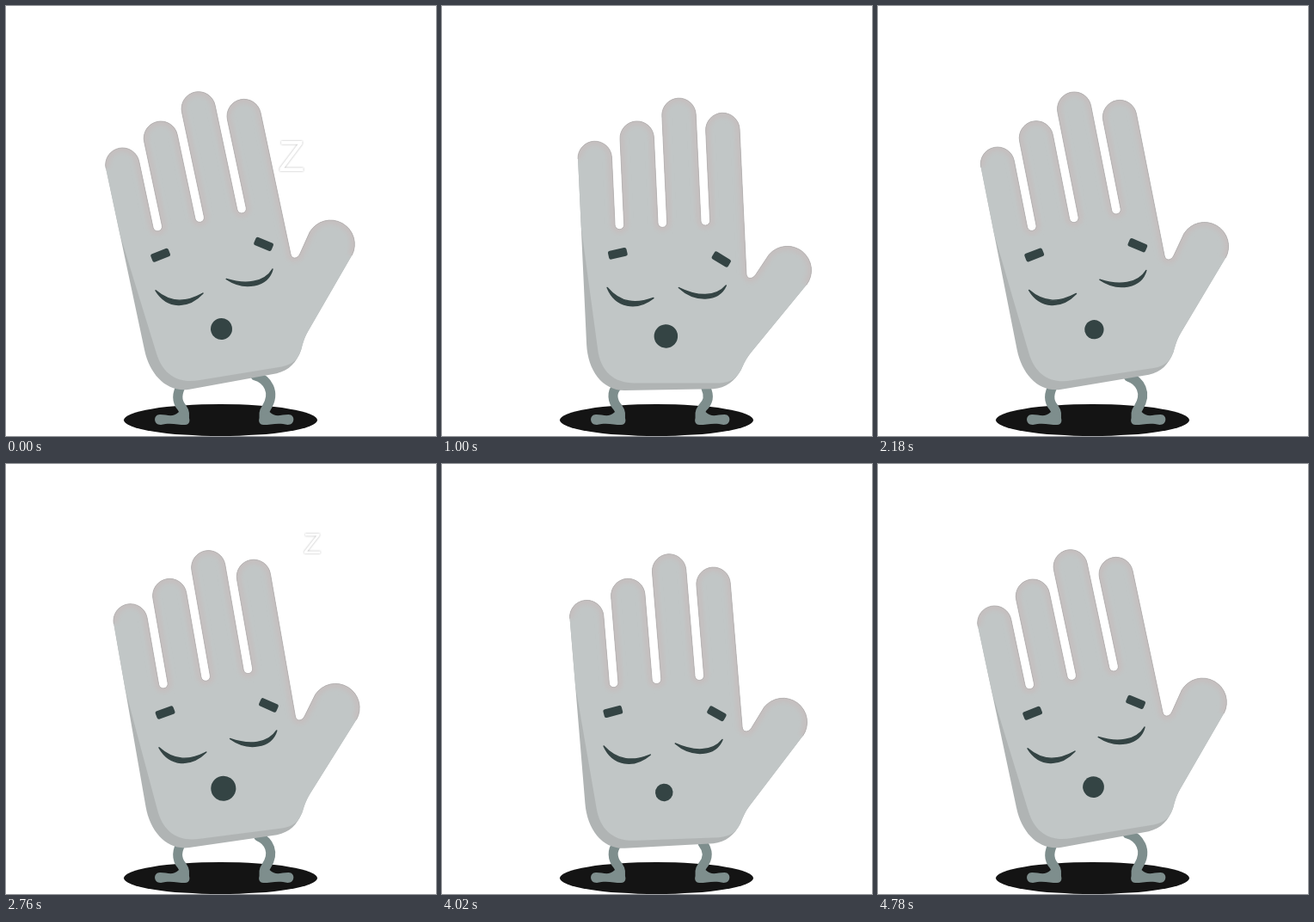
Write an HTML page that moves like this. It is 500x500 px and loops after 4800 ms.

```html
<!DOCTYPE html>
<html lang="en">
<head>
<meta charset="utf-8">
<title>Sleepy hand</title>
<style>
  html, body { margin: 0; width: 100%; height: 100%; overflow: hidden; background: #fff; }
  svg { display: block; width: 100vw; height: 100vh; }
  .leg { fill: none; stroke: #7e8e8d; stroke-width: 11; stroke-linecap: round; }
  .foot { fill: #7e8e8d; }
  .face { fill: #344444; }
  .lid { stroke: #344444; stroke-width: 1.5; stroke-linejoin: round; }
  .z {
    font-family: "Liberation Sans", Arial, sans-serif;
    text-anchor: middle;
    fill: #fff;
    filter: drop-shadow(0 0 1.2px #b4b4b4);
  }
</style>
</head>
<body>
<svg viewBox="0 0 500 500">
  <defs>
    <clipPath id="inside"><path id="clip"/></clipPath>
    <filter id="soft"><feGaussianBlur stdDeviation="2.5"/></filter>
  </defs>

  <ellipse cx="249.5" cy="481.5" rx="112.5" ry="18.5" fill="#141414"/>

  <path id="legL" class="leg"/>
  <path id="legR" class="leg"/>
  <path id="foot" class="foot" d="M179 475 C188 475 194 479 201 472 L211 475 C215 481 214 487 208 487 C200 487 191 484 180 487 C171 487 171 475 179 475Z"/>
  <use href="#foot" transform="translate(507.5) scale(-1 1)"/>

  <g id="hand">
    <path id="shade" fill="#b0b4b4"/>
    <path id="palm" fill="#c1c6c6"/>
    <g clip-path="url(#inside)">
      <path id="glow" fill="none" stroke="#c5bfbf" stroke-width="10" filter="url(#soft)"/>
    </g>
    <path id="edge" fill="none" stroke="#b3b0b0" stroke-width=".8"/>

    <g class="face">
      <rect x="-11" y="-5" width="22" height="10" rx="2.5" transform="translate(7.4 -152) rotate(-10)"/>
      <rect x="-11" y="-5" width="22" height="10" rx="2.5" transform="translate(127.4 -139.7) rotate(34)"/>
      <path class="lid" d="M-6.6 -113 C2 -89 26 -84 46.5 -98.4 C26 -92 8 -94 -6.6 -113Z"/>
      <path class="lid" d="M76.5 -109 C94 -91 122 -90 131.5 -109 C119 -95.5 97 -97.5 76.5 -109Z"/>
      <circle id="mouth" cx="58.9" cy="-53.4"/>
    </g>
  </g>

  <text id="z" class="z">Z</text>
</svg>

<script>
const $ = id => document.getElementById(id);
const set = (id, attrs) => {
  for (const name in attrs) $(id).setAttribute(name, attrs[name]);
};
const mix = (a, b, k) => a + (b - a) * k;

const PERIOD = 2400;
const Z_TIME = 420;
const R = 19.7;
// start and end of each letter: x, y, height
const LETTERS = [
  [[332, 174.5, 40], [360, 78, 25]],
  [[325, 143.4, 32], [361.8, 90.6, 24.7]]
];

// finger centres and tip heights
const fingers = [[-14, -264], [36, -285], [86, -309.5], [136, -290]];
let outline = "";
fingers.forEach(([x, y], i) => {
  const gap = 50 - 2 * R;
  outline += `${i ? "L" : "M"}${x - R} ${y} a${R} ${R} 0 0 1 ${2 * R} 0 `;
  if (i < 3) outline += `V${-180 - gap / 2} a${gap / 2} ${gap / 2} 0 0 0 ${gap} 0 `;
});
outline += "V-122 C155.5 -115.5 162 -114 166.5 -120 L183 -142.5 A28 28 0 0 1 225 -105.5 ";

const side = outline + "L157 -30 C150 -22 148 -17 144.3 -10 ";
const whole = side + "C136 3 126 10 111 10.5 L8 7.5 C-18 6.5 -33.7 -18 -33.7 -48 Z";
const front = side + "C138 0 132 4 118 4 L22 -.5 C-4 -1 -19 -16 -21 -42 L-33.7 -185 Z";
set("shade", { d: whole });
set("clip", { d: front });
set("palm", { d: front });
set("glow", { d: outline });
set("edge", { d: outline });

function drawZ(t) {
  const step = LETTERS[Math.floor(t / Z_TIME)];
  set("z", { visibility: step ? "visible" : "hidden" });
  if (!step) return;
  const k = t % Z_TIME / Z_TIME;
  const [x, y, h] = step[0].map((v, i) => mix(v, step[1][i], k));
  const size = h * 1.25;
  set("z", { x, y: y + size * 0.36, "font-size": size });
}

function draw(now) {
  const t = now % PERIOD;
  const phase = t / PERIOD * 2 * Math.PI;
  const sway = (1 - Math.cos(phase)) / 2;
  const k = sway / 0.77;

  set("hand", { transform: `translate(204 440) rotate(${-12 + 10 * sway})` });
  set("mouth", { r: 12.5 + 2.5 * Math.sin(phase) });
  set("legL", {
    d: `M${mix(205, 203.5, k)} ${mix(439, 442, k)} C${mix(199, 197.5, k)} 449 197.5 459 204.5 467 Q209.5 474 206.5 481`
  });
  set("legR", {
    d: `M${mix(290, 304, k)} ${mix(430, 442, k)} C${mix(304, 310, k)} ${mix(434, 450, k)} ${mix(314, 310, k)} ${mix(449, 459, k)} 303 467 Q298 474 301 481`
  });
  drawZ(t);
}

const start = performance.now();
function tick() {
  draw(performance.now() - start);
  requestAnimationFrame(tick);
}
tick();
</script>
</body>
</html>
```
